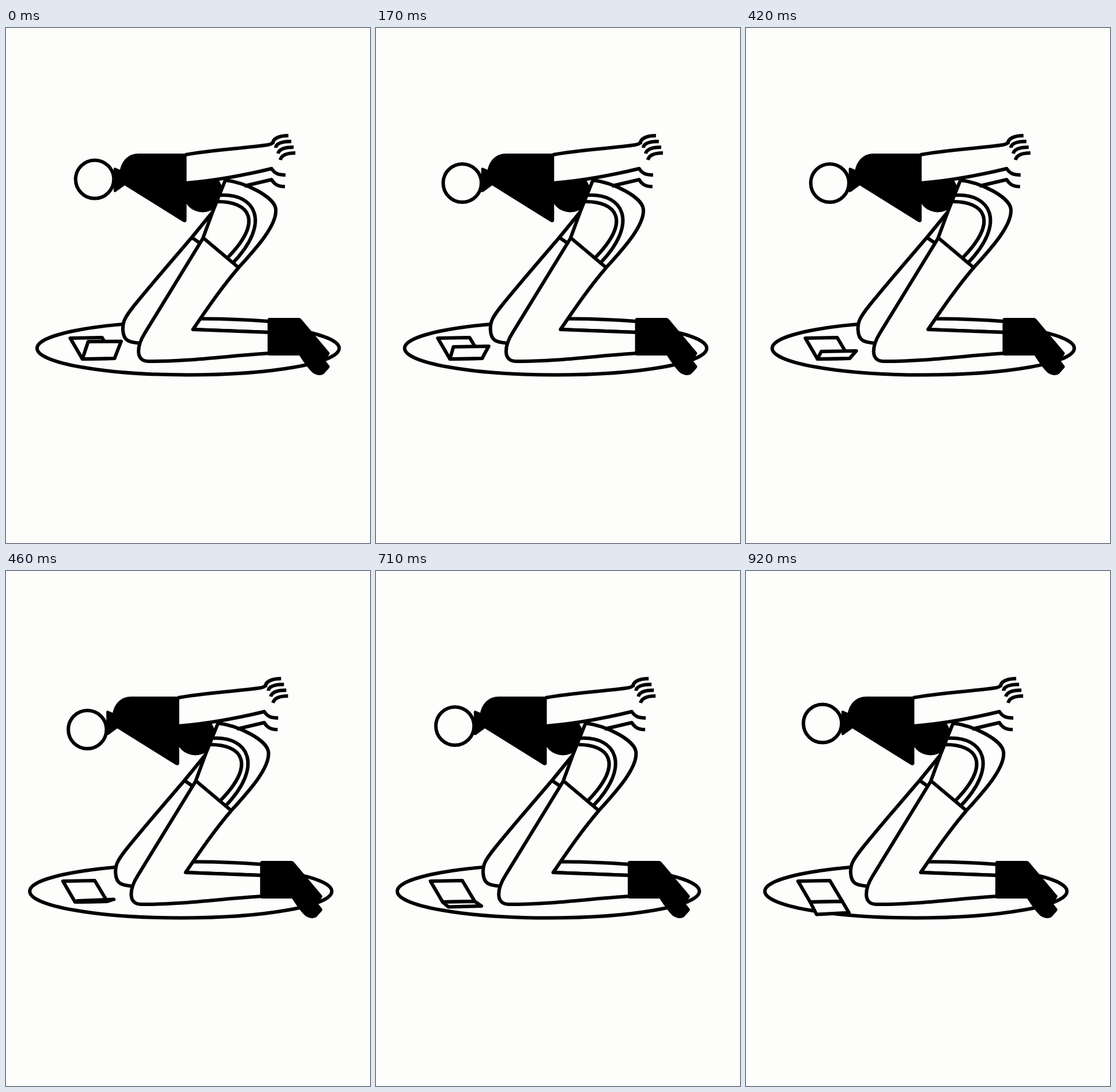
Animation of 629 by 890 pixels, one loop 0.96 s. Source, as an HTML page:

```html
<!DOCTYPE html>
<html lang="en">
<head>
<meta charset="utf-8">
<title>Kneeling figure</title>
<style>
  html, body { margin: 0; width: 100%; height: 100%; overflow: hidden; background: #fdfdfc; }
  svg { display: block; width: 100%; height: 100%; }
  .line { fill: none; stroke: #000; stroke-width: 6; stroke-linejoin: round; }
  .paper { fill: #fdfdfc; }
  .ink { fill: #000; }
</style>
</head>
<body>
<svg viewBox="0 0 629 890">
  <g id="scene">
    <ellipse class="line" cx="314.7" cy="553.5" rx="261" ry="46"/>

    <!-- laptop -->
    <path class="line paper" d="M111 536L166 535L187.500 571L132 572Z"/>
    <path class="line paper" id="base"/>

    <!-- far leg -->
    <path class="line paper" d="M335 502.500Q390 502 455 507V526L323 521Z"/>
    <path class="paper" d="M357 318L203 512L205 538L229 545L340 364Z"/>
    <path class="line paper" d="M357 318L321 362C285 404 252 442 222 479C206 499 201 508 202 522C203 541 213 543 229 544.500"/>
    <path class="line" d="M321 362L334 371"/>

    <circle class="ink" cx="340" cy="284" r="34.500"/>

    <!-- near leg -->
    <path class="line paper" d="M379 263L357 318L340 364L240 527C225 551 224 576 246 576C310 577 390 566 455 562V526L323 521C347 486 372 449 402 414C430 383 470 340 466 312C463 292 415 267 379 263Z"/>
    <path class="line" d="M340 362L403 415M371 289C431 286 459 336 392 406M366 300C419 300 447 332 382 398"/>

    <!-- arms -->
    <path class="line" d="M412 273L459 262C464 271 471 274 482 274"/>
    <path class="paper" d="M310 219C350 211 420 207 461 200V243C420 253 370 263 310 268Z"/>
    <path class="line" d="M310 219C350 211 420 207 452 202Q459 201 462 197M310 268C370 263 418 253 459 243C464 251 470 254 483 254"/>
    <path class="line" d="M461 201C460 191 472 186 488 186M466 207C467 199 477 196 493 196M470 217C472 209 481 206 497 206M474 228C476 220 485 216 500 216"/>

    <!-- shirt, neck, boot -->
    <path class="ink" d="M229 217H312V333Q311 337 306 335L205 272L190 283Q186 285 186 281V243Q187 240 190 242L197 245C201 228 212 217 229 217Z"/>
    <path class="ink" d="M452 504Q452 501 455 501H506Q509 501 511 504L559 561Q560 563 558 565L552 575L559 584Q560 586 558 588L549 598Q541 603 530 596Q521 588 507 566H455Q452 566 452 563Z"/>

    <circle class="line paper" id="head" cx="153.300" r="33"/>
  </g>
</svg>
<script>
  const LOOP = 960, STEP = 4.22;
  // start ms, head y, front edge of the laptop base: left x, left y, right y
  const poses = [
    [0, 261.5, 142, 542, 541.5],
    [160, 268, 138, 551, 550],
    [330, 268, 138.5, 559, 558],
    [455, 274, 136, 570, 567.5],
    [705, 268, 142, 580.5, 579],
    [830, 263.5, 143, 593.5, 590.5]
  ];
  const [scene, head, base] = ['scene', 'head', 'base'].map(id => document.getElementById(id));
  let shown = -1;

  function show(i) {
    const [, headY, x, leftY, rightY] = poses[i];
    scene.setAttribute('transform', `translate(${-STEP * i} 0)`);
    head.setAttribute('cy', headY);
    base.setAttribute('d', `M132 572L187.5 571L199 ${rightY}L${x} ${leftY}Z`);
    shown = i;
  }

  function tick() {
    const t = performance.now() % LOOP;
    const i = poses.findLastIndex(p => p[0] <= t);
    if (i !== shown) show(i);
    requestAnimationFrame(tick);
  }
  tick();
</script>
</body>
</html>
```
